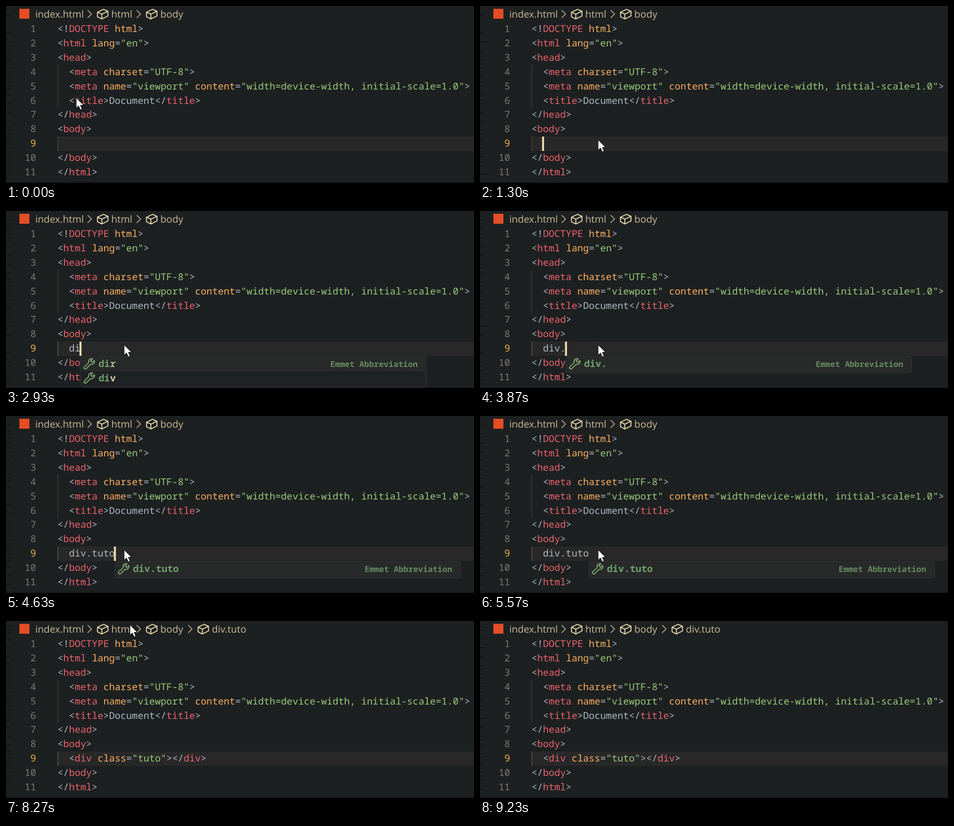
Recreate the animation shown at these times as an HTML page. Size 840x320 px, loop 9310 ms.

```html
<!DOCTYPE html>
<html lang="en">
<head>
<meta charset="UTF-8">
<title>Typing an abbreviation</title>
<style>
  html, body { margin: 0; width: 100%; height: 100%; overflow: hidden; background: #1d2021; }
  svg { display: block; }
  text { white-space: pre; text-rendering: geometricPrecision; }
  .code { font: 500 17.15px "Noto Sans Mono", monospace; font-variant-ligatures: none; fill: #b0b7c3; }
  .tag { fill: #ea636d; }
  .attr { fill: #fbb062; }
  .str { fill: #9acb7c; }
  .num { font-weight: 400; fill: #7f796e; text-anchor: end; }
  .active { fill: #efb24a; }
  .crumb { font: 17.6px "Open Sans", "Noto Sans", sans-serif; fill: #c9b994; }
  .line { fill: none; stroke: #ebd9ac; stroke-width: 1.7; stroke-linejoin: round; stroke-linecap: round; }
  .chevron { stroke: #b9aa89; stroke-width: 1.6; }
  .option { font-weight: 600; fill: #d5c9a3; }
  .selected { fill: #a9b98b; }
  .match { fill: #6fa16b; }
  .detail { font-size: 14.55px; font-weight: 600; fill: #668c62; text-anchor: end; }
</style>
</head>
<body>
<svg width="840" height="320" viewBox="0 0 840 320">
  <rect width="840" height="320" fill="#1d2021"/>
  <rect y="318" width="840" height="2" fill="#16191d"/>
  <g id="ticks" fill="#080a0a"></g>
  <rect x="92" y="236" width="748" height="26" fill="#282828"/>
  <rect x="92.5" y="106" width="1.2" height="78" fill="#3b4035"/>
  <rect id="guide" x="92.5" y="236" width="1.2" height="26"/>
  <g id="crumbs"></g>
  <g id="lines"></g>
  <text id="typed" class="code" y="254"></text>
  <rect id="caret" y="236" width="3.6" height="26" fill="#ebd9ac"/>
  <g id="popup"></g>
  <path id="pointer" d="M0 0V18.5L4.3 14.6L7.4 21.6L10.6 20.2L7.6 13.4H13.4Z"
        fill="#fff" stroke="#111" stroke-width="1"/>
</svg>
<script>
const LOOP = 9310, COL = 10.29, LEFT = 92.4, BLINK = 500;
const EXPAND = 6330, CRUMB = 6450;
const $ = id => document.getElementById(id);
const colX = col => LEFT + col * COL;
const escapeText = s => s.replace(/&/g, "&amp;").replace(/</g, "&lt;").replace(/>/g, "&gt;");
const span = (cls, s) => `<tspan class="${cls}">${escapeText(s)}</tspan>`;

const source = [
  "<!DOCTYPE html>",
  '<html lang="en">',
  "<head>",
  '  <meta charset="UTF-8">',
  '  <meta name="viewport" content="width=device-width, initial-scale=1.0">',
  "  <title>Document</title>",
  "</head>",
  "<body>",
  "",
  "</body>",
  "</html>"
];
const expanded = '<div class="tuto"></div>';

const keys = [
  { at: 2450, text: "d", options: ["data", "datag"] },
  { at: 2800, text: "di", options: ["dir", "div"] },
  { at: 3100, text: "div", options: ["div"] },
  { at: 3430, text: "div.", options: ["div."] },
  { at: 3970, text: "div.t", options: ["div.t"] },
  { at: 4180, text: "div.tu", options: ["div.tu"] },
  { at: 4400, text: "div.tut", options: ["div.tut"] },
  { at: 4630, text: "div.tuto", options: ["div.tuto"] }
];

function highlight(line) {
  return line.replace(/(<[!\/]?)(\w+)([^>]*)(>)|([^<]+)/g, (all, open, name, attrs, close, plain) => {
    if (plain !== undefined) return escapeText(plain);
    const rest = attrs.replace(/("[^"]*")|(\w+)/g, (m, str) => span(str ? "str" : "attr", m));
    return escapeText(open) + span("tag", name) + rest + "&gt;";
  });
}

function crumb(label, textX) {
  const cube = `<path class="line" transform="translate(${textX - 26} 5)"
    d="M12 1L20 4.6V13L9 18.4L1.2 14.4V6.2ZM1.2 6.2L9 9.8L20 4.6M9 9.8V18.4"/>`;
  const chevron = `<path class="line chevron" d="M${textX - 42} 8l6.5 6.5l-6.5 6.5"/>`;
  return cube + chevron + `<text class="crumb" x="${textX}" y="21">${label}</text>`;
}

function popupMarkup({ text, options }) {
  const x = colX(2 + text.length) + 0.5, height = options.length * 25.6 + 3.5;
  let out = `<rect x="${x}" y="263.5" width="620" height="${height}" rx="3" fill="#1f2223" stroke="#383a3a"/>
    <rect x="${x + 1}" y="264.5" width="618" height="${options.length > 1 ? 25.5 : 27}" fill="#282929"/>`;
  options.forEach((option, i) => {
    const y = 282 + i * 25.6;
    out += `<path class="line" style="stroke:#83ad74" transform="translate(${x + 5} ${y - 16})"
      d="M19.5 4.2L15.8 7.8L12.8 4.8L16.4 1.3C12.5 -.1 8.2 3 9.5 8L1.8 15.5C-.5 18 2.6 21.2 5.2 18.8L12.8 11.2C17.8 12.5 21 8 19.5 4.2Z"/>
      <text class="code option${i ? "" : " selected"}" x="${x + 32}" y="${y}">${span("match", text)}${option.slice(text.length)}</text>`;
  });
  return out + `<text class="code detail" x="${x + 605}" y="282">Emmet Abbreviation</text>`;
}

// Pointer position at a time, or null once it has left the stage.
function pointerAt(t) {
  const ease = (from, to) => {
    const u = Math.min(1, Math.max(0, (t - from) / (to - from)));
    return u * u * (3 - 2 * u);
  };
  if (t > 8350) return null;
  const drift = ease(30, 430), settle = ease(670, 1170), leave = ease(8000, 8350);
  return [126 + 8 * drift + 78 * settle + 12 * leave,
          166 + 14 * drift + 62 * settle - 270 * leave];
}

// The blink restarts at every edit; before any edit it runs from 300 ms.
function caretOn(t, lastKey) {
  const start = t >= EXPAND ? EXPAND : lastKey ? lastKey.at : 300;
  return (Math.floor((t - start) / BLINK) & 1) === 0;
}

$("ticks").innerHTML = Array.from({ length: 19 }, (_, i) =>
  `<rect y="${16 * (i + 1)}" width="7.5" height="1"/>`).join("");
$("lines").innerHTML = source.map((line, i) => {
  const y = Math.round(47 + i * 25.9);
  return `<text class="code num${i === 8 ? " active" : ""}" x="54" y="${y}">${i + 1}</text>
    <text class="code" x="${LEFT}" y="${y}">${highlight(line)}</text>`;
}).join("");
$("crumbs").innerHTML =
  `<rect x="24" y="5" width="18" height="18" fill="#e44d26"/>
   <text class="crumb" x="52.5" y="21">index.html</text>` +
  crumb("html", 189) + crumb("body", 277) + `<g id="newCrumb">${crumb("div.tuto", 369.5)}</g>`;
$("typed").setAttribute("x", colX(2));

let shown;
function draw(t) {
  const key = keys.filter(k => k.at <= t).pop();
  const done = t >= EXPAND;
  const state = done ? "done" : key ? key.text : "";
  if (state !== shown) {
    shown = state;
    $("typed").innerHTML = done ? highlight(expanded) : state;
    $("popup").innerHTML = key && !done ? popupMarkup(key) : "";
    $("guide").setAttribute("fill", state ? "#5c5d3d" : "#45483a");
    const col = 2 + (done ? expanded.indexOf("</") : state.length);
    $("caret").setAttribute("x", colX(col) - 1.6);
  }
  $("caret").style.display = caretOn(t, key) ? "" : "none";
  $("newCrumb").style.display = t >= CRUMB ? "" : "none";
  const pos = pointerAt(t);
  $("pointer").style.display = pos ? "" : "none";
  if (pos) $("pointer").setAttribute("transform", `translate(${pos[0]} ${pos[1]})`);
}

const begin = performance.now();
function tick() {
  draw((performance.now() - begin) % LOOP);
  requestAnimationFrame(tick);
}
draw(0);
requestAnimationFrame(tick);
</script>
</body>
</html>
```
